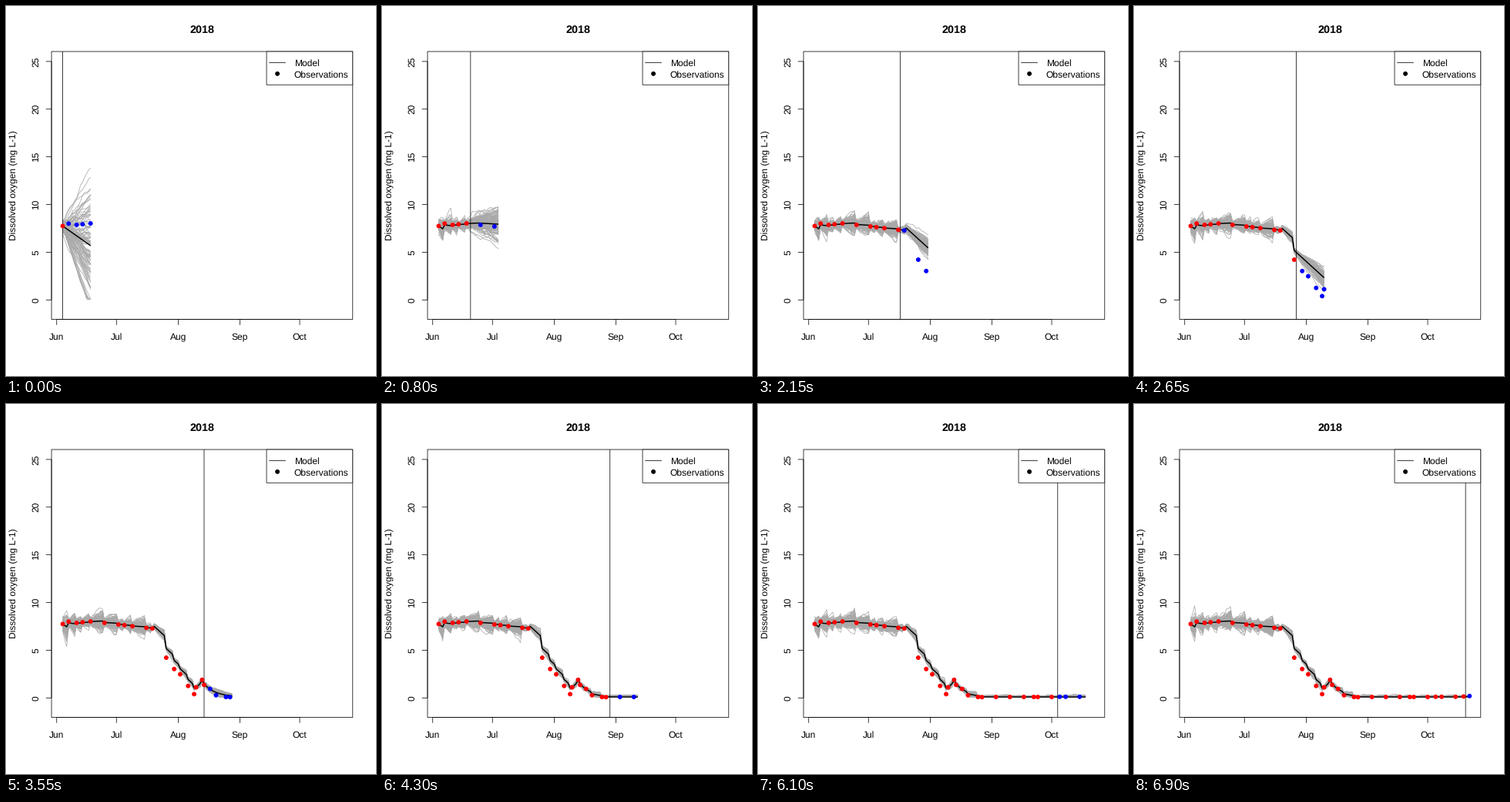
These frames come from a looping animation (480 px wide and 480 px high, 6950 ms). A matplotlib script:

```python
import numpy as np
import matplotlib.pyplot as plt
from matplotlib.animation import FuncAnimation
from matplotlib.collections import LineCollection
from matplotlib.patches import PathPatch, Rectangle
from matplotlib.path import Path

SIZE, DPI = 480, 72
FRAMES, INTERVAL = 139, 50
FIRST, LAST, HORIZON, MEMBERS = 3, 143, 14, 100
LEFT, RIGHT, TOP, BOTTOM = 59.04, 449.76, 59.04, 406.56
THIN, THICK, RADIUS = 0.75, 1.5, 2.95
FLOOR = 0.07

# Days since 1 June and dissolved oxygen in mg/L
OBS = {3: 7.75, 6: 8.0, 10: 7.87, 13: 7.93, 17: 8.02, 24: 7.87, 31: 7.7,
       34: 7.63, 38: 7.52, 45: 7.35, 48: 7.28, 55: 4.22, 59: 3.03, 62: 2.48,
       66: 1.26, 69: 0.4, 70: 1.12, 73: 1.9, 74: 1.37, 77: 0.95, 80: 0.28,
       85: 0.1, 87: 0.08, 94: 0.1, 101: 0.1, 108: 0.1, 113: 0.1, 115: 0.1,
       122: 0.1, 126: 0.12, 129: 0.12, 136: 0.12, 140: 0.15, 143: 0.2}
OBS_DAYS = np.array(list(OBS))
OBS_VALUES = np.array(list(OBS.values()))

plt.rcParams.update({"font.family": "Liberation Sans", "font.size": 12,
                     "text.hinting": "none"})


def px(day):
    """Day to horizontal pixel; the axis is padded by 4 % on both sides."""
    pad = 0.04 * (LAST - FIRST)
    return LEFT + (day - FIRST + pad) * (RIGHT - LEFT) / (LAST - FIRST + 2 * pad)


def py(value):
    return BOTTOM - (value + 2.04) * (BOTTOM - TOP) / 28.08


def drift(day, x, seen):
    """Daily change of the modelled oxygen on the way to the given day."""
    if day <= 48:
        trend = 0.01 if day < 24 else -0.012
        return trend - 0.157 * np.exp(-1.5 * (seen - 1))
    if day == 49:
        return 0.2
    if day <= 70:
        return -0.19
    if day <= 73:
        return 0.22
    return -0.16 * (x - 0.1)


def gain(day):
    if day < 55 or 70 <= day < 74:
        return 0.8
    return np.interp(day, [55, 59], [0.55, 0.35]) if day < 70 else 0.5


def noise_scale(day):
    return 1.0 if day < 45 else 0.55 if day < 85 else 0.25


def run_model(today, rng):
    """Filter up to today, then forecast; row 0 is the noise-free centre."""
    def normal():
        z = rng.standard_normal(MEMBERS + 1)
        z[0] = 0
        return z

    days = np.arange(FIRST, min(today + HORIZON, LAST) + 1)
    x = OBS[FIRST] + 0.32 * normal()
    slope, seen = normal(), 1
    path = [x]
    for day in days[1:]:
        scale = noise_scale(day)
        spread = 0.045 + 0.175 * np.exp(-0.85 * (seen - 1))
        x = x + drift(day, x, seen) + scale * (spread * slope + 0.15 * normal())
        x = np.maximum(x, FLOOR)
        if day <= today and day in OBS:
            centre = x[0] + gain(day) * (OBS[day] - x[0])
            x = centre + 0.15 * (x - x[0]) + 0.17 * scale * normal()
            x = np.maximum(x, FLOOR)
            slope, seen = normal(), seen + 1
        path.append(x)
    return days, np.array(path).T


fig = plt.figure(figsize=(SIZE / DPI, SIZE / DPI), dpi=DPI, facecolor="white")
ax = fig.add_axes([0, 0, 1, 1])
ax.set(xlim=(0, SIZE), ylim=(SIZE, 0))
ax.axis("off")


def line(xs, ys, z=1, width=THIN):
    return ax.plot(xs, ys, color="black", lw=width, zorder=z, snap=False,
                   solid_capstyle="butt", solid_joinstyle="round")[0]


def circles(xs, ys):
    return Path.make_compound_path(
        *(Path.circle(p, RADIUS) for p in zip(xs, ys)))


def dots(color, z, xs=(0,), ys=(0,)):
    return ax.add_patch(PathPatch(circles(xs, ys), fc=color, lw=0, zorder=z))


def box(x0, y0, x1, y1, z, fill):
    ax.add_patch(Rectangle((x0, y0), x1 - x0, y1 - y0, lw=THIN, ec="black",
                           fc=fill, zorder=z, snap=False))


def label(x, y, text, ha="center", **kw):
    ax.text(x, y, text, ha=ha, va="baseline", rotation_mode="anchor",
            zorder=9, **kw)


box(LEFT, TOP, RIGHT, BOTTOM, 6, "none")

months = {"Jun": 0, "Jul": 30, "Aug": 61, "Sep": 92, "Oct": 122}
line([px(0), px(122)], [BOTTOM, BOTTOM])
for month, day in months.items():
    line([px(day)] * 2, [BOTTOM, BOTTOM + 7.2])
    label(px(day), 433, month)

line([LEFT, LEFT], [py(0), py(25)])
for value in range(0, 26, 5):
    line([LEFT - 7.2, LEFT], [py(value)] * 2)
    label(42, py(value), str(value), rotation=90)

label(13.4, (TOP + BOTTOM) / 2, "Dissolved oxygen (mg L-1)", rotation=90)
label((LEFT + RIGHT) / 2, 35, "2018", fontsize=14.4, fontweight="bold")

# Legend
box(338.03, TOP, RIGHT, TOP + 43.2, 7, "white")
line([341.27, 362.87], [73.44, 73.44], 8)
dots("black", 8, [352.07], [87.84])
label(373.67, 78, "Model", "left")
label(373.67, 92.7, "Observations", "left")

ensemble = LineCollection([], colors="darkgray", linewidths=THIN, zorder=2)
ax.add_collection(ensemble, autolim=False)
mean = line([], [], 3, THICK)
now = line([], [], 4)
past, future = dots("red", 5), dots("blue", 5)


def draw(frame):
    today = FIRST + frame
    days, runs = run_model(today, np.random.default_rng(500 + frame))
    xs = px(days)
    ensemble.set_segments([np.column_stack([xs, py(r)]) for r in runs[1:]])
    mean.set_data(xs, py(runs[0]))
    now.set_data([px(today)] * 2, [TOP, BOTTOM])
    old = OBS_DAYS <= today
    ahead = ~old & (OBS_DAYS <= today + HORIZON)
    for artist, mask in ((past, old), (future, ahead)):
        artist.set_path(circles(px(OBS_DAYS[mask]), py(OBS_VALUES[mask])))
    return ensemble, mean, now, past, future


anim = FuncAnimation(fig, draw, frames=FRAMES, interval=INTERVAL,
                     repeat=True, repeat_delay=0)
plt.show()
```
